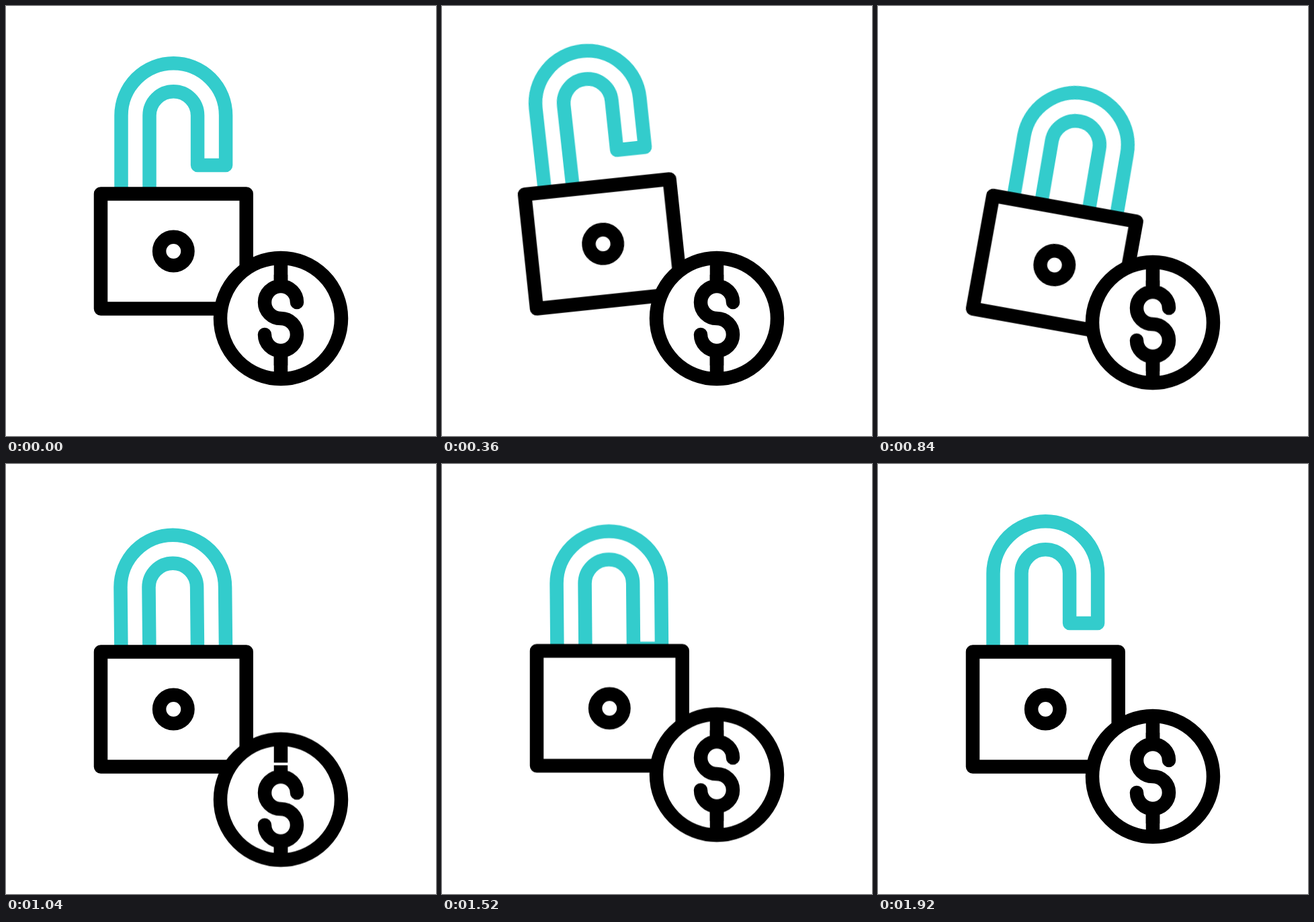
Animation, 640 px wide and 640 px high, one loop 2 s. Source, as an HTML page:

```html
<!DOCTYPE html>
<html lang="en">
<head>
<meta charset="utf-8">
<title>Padlock and coin</title>
<style>
  html, body { margin: 0; width: 100%; height: 100%; overflow: hidden; background: #fff; }
  svg { display: block; width: 100vw; height: 100vh; }

  .line {
    fill: none;
    stroke: #000;
    stroke-width: 20.5;
    stroke-linejoin: round;
  }
  .solid { fill: #fff; }
  .round { stroke-linecap: round; }

  .lock, .shackle, .coin, .sign {
    animation: 2s cubic-bezier(.37, 0, .63, 1) infinite;
  }
  .lock { transform-origin: 141px 450.5px; animation-name: swing; }
  .shackle { stroke: #33cccc; animation-name: latch; }
  .coin { animation-name: bounce; }
  .sign { animation-name: lag; }

  /* Lean back, slam forward, settle, then hop as the shackle opens. */
  @keyframes swing {
    0%, 4% { transform: translateY(0) rotate(0deg); }
    32% { transform: translateY(0) rotate(-12deg); }
    41% { transform: translateY(0) rotate(10.5deg); }
    51%, 72.35% { transform: translateY(0) rotate(0deg); }
    86.5% { transform: translateY(-9px) rotate(0deg); }
    96%, 100% { transform: translateY(0) rotate(0deg); }
  }

  @keyframes latch {
    0%, 6%, 96%, 100% {
      d: path("M171.5 285 L171.5 163 A77.8 77.8 0 0 1 327.1 163 L327.1 237 L285.1 237 L285.1 163 A35.8 35.8 0 0 0 213.5 163 L213.5 285");
    }
    32% {
      d: path("M171.5 285 L170 143 A77.8 77.8 0 0 1 325.6 143 L325.6 217 L283.6 217 L283.6 143 A35.8 35.8 0 0 0 212 143 L213.5 285");
    }
    40%, 72.35% {
      d: path("M171.5 285 L170.5 183.5 A77.8 77.8 0 0 1 326.1 183.5 L327.1 284.5 L285.1 284.5 L284.1 183.5 A35.8 35.8 0 0 0 212.5 183.5 L213.5 285");
    }
    86.5% {
      d: path("M171.5 285 L171 156.5 A77.8 77.8 0 0 1 326.6 156.5 L326.6 230.5 L284.6 230.5 L284.6 156.5 A35.8 35.8 0 0 0 213 156.5 L213.5 285");
    }
  }

  @keyframes bounce {
    0%, 38.9% { transform: translateY(0); }
    50.5% { transform: translateY(36px); }
    64.5% { transform: translateY(-15px); }
    80.5%, 100% { transform: translateY(0); }
  }

  /* The sign travels further than its ring. */
  @keyframes lag {
    0%, 38.9% { transform: translateY(0); }
    50.5% { transform: translateY(14.5px); }
    64.5% { transform: translateY(-6px); }
    80.5%, 100% { transform: translateY(0); }
  }
</style>
</head>
<body>
<svg viewBox="0 0 640 640">
  <g class="lock">
    <path class="line shackle" d="M171.5 285 L171.5 163 A77.8 77.8 0 0 1 327.1 163 L327.1 237 L285.1 237 L285.1 163 A35.8 35.8 0 0 0 213.5 163 L213.5 285"/>
    <rect class="line solid" x="141" y="279.5" width="216.7" height="171"/>
    <circle class="line" cx="249.3" cy="365" r="21.2"/>
  </g>
  <g class="coin">
    <circle class="line solid" cx="409" cy="465" r="90"/>
    <path class="line" d="M409 375V410M409 520V555"/>
    <g class="sign">
      <path class="line" d="M409 400V417M409 513V535"/>
      <path class="line round" d="M433 441A24 24 0 1 0 409 465A24 24 0 1 1 385 489"/>
    </g>
  </g>
</svg>
</body>
</html>
```
